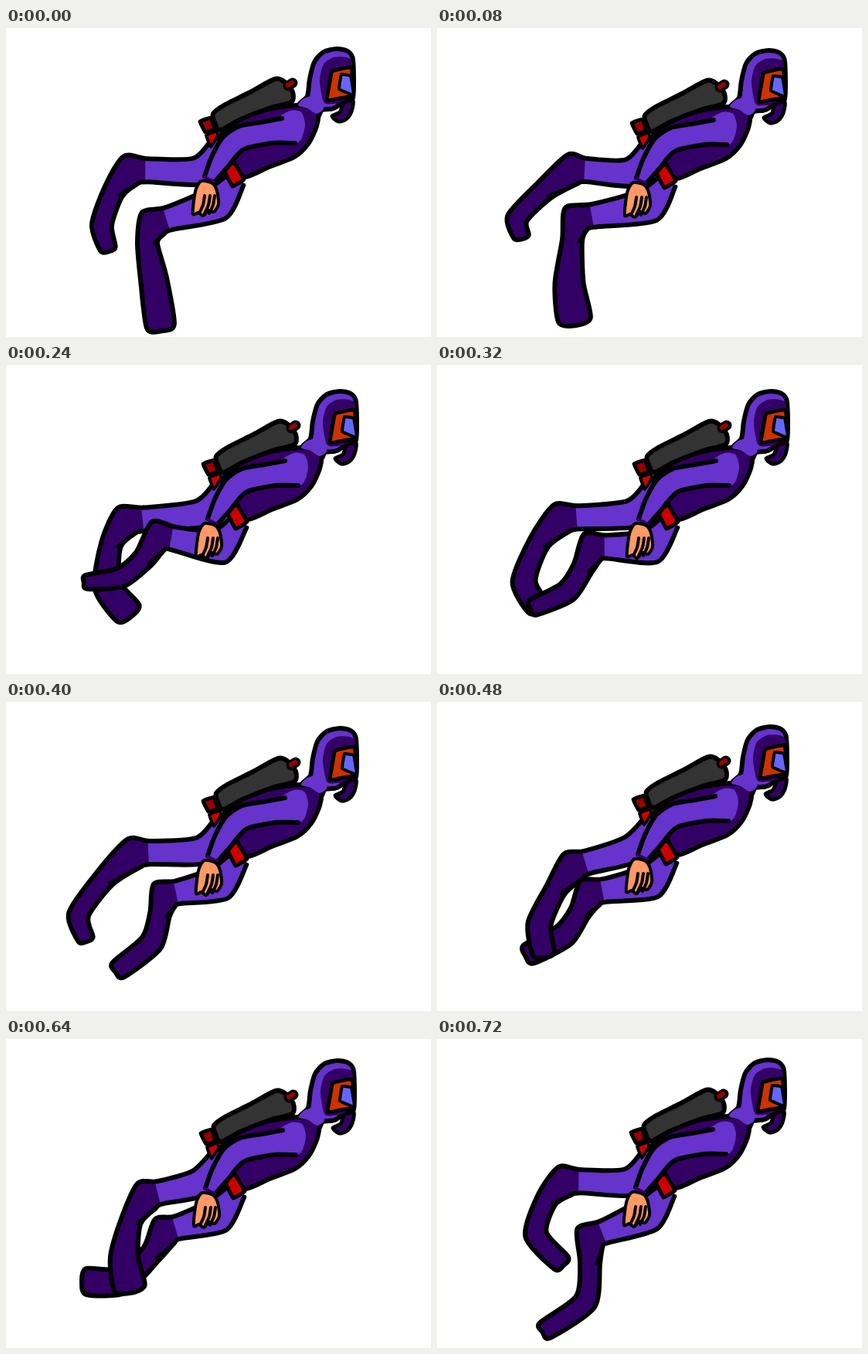
Write an HTML page with a canvas that moves like this. It is 550 by 400 pixels and loops after 0.8 s.

```html
<!DOCTYPE html>
<html lang="en">
<head>
<meta charset="utf-8">
<title>Swimming diver</title>
<style>
  html, body { margin: 0; width: 100%; height: 100%; overflow: hidden; background: #fff; }
  canvas { display: block; }
</style>
</head>
<body>
<canvas id="stage" width="550" height="400"></canvas>
<script>
const ctx = document.getElementById('stage').getContext('2d');
const STEP = 80, STEPS = 10;
const LIGHT = '#6633cc', DARK = '#330066', RED = '#cc0000', MAROON = '#990000', SKIN = '#ff9966';

const points = text => text.split(' ').map(p => p.split(',').map(Number));
const mix = (a, b, t) => a.map((v, i) => v + (b[i] - v) * t);

// Smooth curve through the points; k sets how round the corners are.
function trace(pts, closed, k) {
  const n = pts.length;
  const at = i => closed ? pts[(i + n) % n] : pts[Math.max(0, Math.min(n - 1, i))];
  ctx.beginPath();
  ctx.moveTo(...pts[0]);
  for (let i = 0; i < (closed ? n : n - 1); i++) {
    const [a, b, c, d] = [at(i - 1), at(i), at(i + 1), at(i + 2)];
    ctx.bezierCurveTo(
      b[0] + (c[0] - a[0]) * k, b[1] + (c[1] - a[1]) * k,
      c[0] - (d[0] - b[0]) * k, c[1] - (d[1] - b[1]) * k, ...c);
  }
  if (closed) ctx.closePath();
}

function fill(pts, color, k = 0.13) {
  trace(pts, true, k);
  ctx.fillStyle = color;
  ctx.fill();
}

function ink(pts, width, color = '#000', k = 0.13) {
  trace(pts, false, k);
  ctx.lineWidth = width;
  ctx.strokeStyle = color;
  ctx.stroke();
}

function shape(text, color, line = 0, k = 0.13) {
  const pts = points(text);
  fill(pts, color, k);
  if (line) {
    trace(pts, true, k);
    ctx.lineWidth = line;
    ctx.strokeStyle = '#000';
    ctx.stroke();
  }
}

const line = (text, width, color) => ink(points(text), width, color);

// Each leg: heel, shin, fin and toe centres, then half the toe width.
const pose = (step, shift, upper, lower, upperInFront = false) =>
  ({ step, shift, upper: points(upper), lower: points(lower), upperInFront });
const poses = [
  pose(0, [0, 0], '161,184 139,212 124,255 132,286 10', '190,253 183,278 191,325 200,386 18'),
  pose(1, [1, 2], '175,183 138,211 104,246 109,270 10', '180,247 175,275 171,330 178,378 21'),
  pose(3, [4, 7], '155,202 136,232 131,285 158,321 18', '197,221 178,251 148,275 104,281 9'),
  pose(5, [4, 7], '165,196 128,228 94,275 103,307 10', '205,250 199,275 188,312 145,347 12'),
  pose(7, [2, 3], '186,230 179,258 171,300 173,345 18', '190,245 170,270 140,292 92,306 15', true),
  pose(8, [1, 1], '182,203 162,235 153,282 160,322 20', '205,249 188,278 150,313 104,314 17', true),
  pose(9, [0, 0], '165,184 142,208 128,253 161,290 12', '198,257 198,290 192,340 140,377 12')
];

function poseAt(step) {
  const next = poses.find(p => p.step >= step);
  if (next.step === step) return next;
  const last = poses[poses.indexOf(next) - 1];
  const t = (step - last.step) / (next.step - last.step);
  const blend = key => last[key].map((p, i) => mix(p, next[key][i], t));
  return { ...next, shift: mix(last.shift, next.shift, t), upper: blend('upper'), lower: blend('lower') };
}

const HIPS = {
  upper: { joints: [[280, 152], [250, 185]], widths: [16, 18] },
  lower: { joints: [[298, 196], [272, 228]], widths: [12, 22] }
};

// A leg is a ribbon around its centre line, with a width at every joint.
function drawLeg(name, { [name]: keys, shift }) {
  const hip = HIPS[name];
  const joints = keys.slice(0, 4), [toeWidth] = keys[4];
  const hips = hip.joints.map(([x, y]) => [x + shift[0], y + shift[1]]);
  const centre = [...hips, mix(joints[0], hips[1], 0.25), ...joints];
  const widths = [...hip.widths, 15, 20, 13, 8 + toeWidth / 2, toeWidth];

  const direction = (a, b) => {
    const length = Math.hypot(b[0] - a[0], b[1] - a[1]);
    return [(b[0] - a[0]) / length, (b[1] - a[1]) / length];
  };
  const tangents = centre.map((p, i) => {
    const before = direction(centre[Math.max(0, i - 1)], centre[Math.max(1, i)]);
    const after = i < centre.length - 1 ? direction(p, centre[i + 1]) : before;
    return direction([0, 0], [before[0] + after[0], before[1] + after[1]]);
  });
  const side = sign => centre.map(([x, y], i) =>
    [x - tangents[i][1] * widths[i] * sign, y + tangents[i][0] * widths[i] * sign]);
  const outer = side(1), inner = side(-1).reverse();
  const tip = joints[3].map((v, i) => v + tangents[6][i] * toeWidth * 0.35);
  const outline = [...outer, tip, ...inner];

  fill(outline, LIGHT);
  fill([...outer.slice(2), tip, ...inner.slice(0, 5)], DARK);
  ink([outer[2], inner[4]], 6, LIGHT);
  ink(outline, 6);
  ink([inner[3], mix(inner[2], centre[4], 0.3)], 5);
}

function drawHead() {
  shape('379,101 390,88 393,66 399,44 411,31 428,27 442,30 449,41 449,90 436,96 424,104 409,106 402,116', LIGHT, 6);
  shape('448,46 440,38 424,38 411,47 406,66 408,84 412,97 424,98 444,92', DARK);
  shape('447,51 422,56 418,75 415,94 432,91 449,87', '#cc3300', 5, 0.04);
  shape('434,60 446,62 450,87 431,79', '#6666ff', 4, 0.03);
  shape('437,97 449,94 447,108 440,118 430,121 422,114 432,109', DARK, 5);
  line('409,106 422,105 436,97', 5);
}

function drawTank() {
  shape('268,111 282,100 316,83 348,66 361,70 371,83 369,96 340,104 302,119 277,132 270,122', '#333333', 6);
  line('365,75 371,71', 13);
  line('365,74 370,71', 6, MAROON);
}

function drawTorso() {
  shape('276,142 302,119 340,105 381,100 403,108 402,127 391,150 373,167 340,180 308,193 294,172', DARK, 6);
  shape('378,100 386,91 404,88 411,104 402,111 390,104', LIGHT);
  shape('282,183 295,174 308,196 293,205', RED, 5, 0.03);
}

function drawArm() {
  shape('257,194 267,165 284,138 312,126 346,118 368,107 382,109 387,124 383,142 374,150 345,149 307,157 291,174 270,199', LIGHT);
  line('257,192 266,167 281,141 302,127 330,122 357,117', 6);
  line('374,149 345,149 310,156 297,167 286,181 270,199', 6);
  line('257,193 269,199', 4, DARK);
  shape('251,121 265,116 270,131 258,135', MAROON, 5, 0.03);
  shape('259,139 273,133 274,140 265,154', RED, 4, 0.03);
}

function drawHand() {
  shape('253,198 267,201 273,211 275,228 269,238 262,236 255,243 249,239 242,241 243,224 246,208', SKIN, 4);
  for (const x of [257, 264, 270]) ink([[x, 217], [x - 2, 229], [x - 7, 240]], 4);
}

function draw(now) {
  const current = poseAt(Math.floor(now / STEP) % STEPS);
  ctx.clearRect(0, 0, 550, 400);
  ctx.lineCap = ctx.lineJoin = 'round';
  const order = current.upperInFront ? ['lower', 'upper'] : ['upper', 'lower'];
  order.forEach(name => drawLeg(name, current));
  ctx.save();
  ctx.translate(...current.shift);
  drawHead();
  drawTorso();
  drawTank();
  drawArm();
  drawHand();
  ctx.restore();
}

const start = performance.now();
function tick() {
  draw(performance.now() - start);
  requestAnimationFrame(tick);
}
tick();
</script>
</body>
</html>
```
